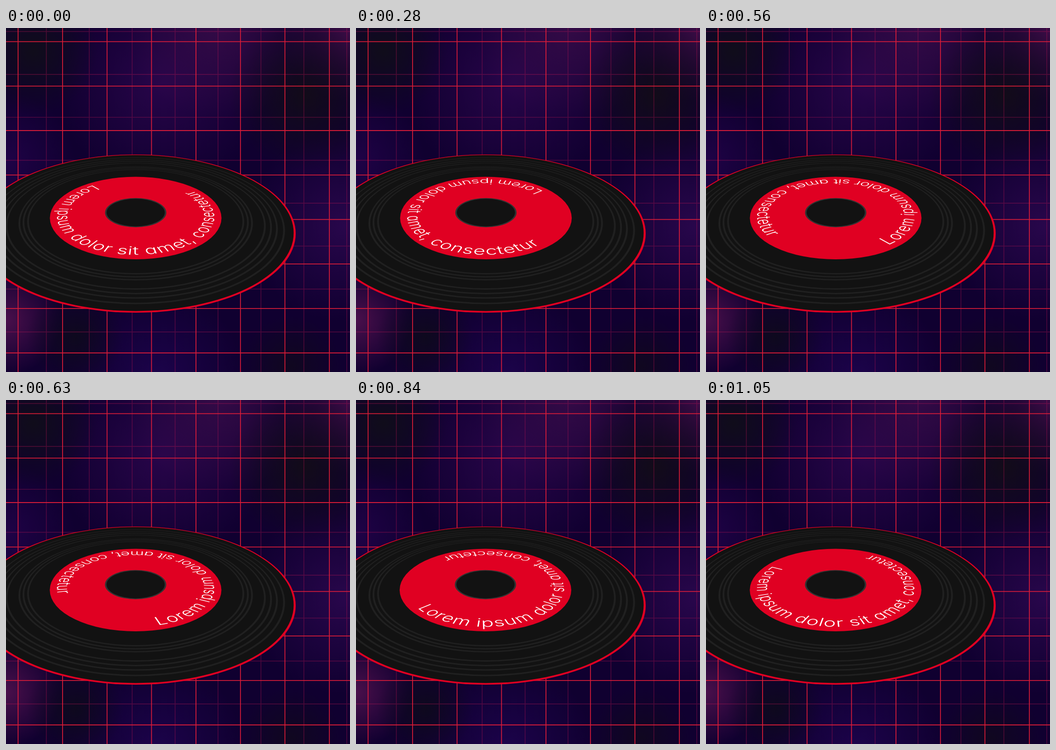
An HTML page with a canvas that plays this animation: 748 by 748 pixels, repeating every 1.12 s.

```html
<!DOCTYPE html>
<html lang="en">
<head>
<meta charset="utf-8">
<title>Spinning record</title>
<style>
  html, body { margin: 0; width: 100%; height: 100%; overflow: hidden; background: #100030; }
  canvas { display: block; width: 748px; height: 748px; }
</style>
</head>
<body>
<canvas id="stage" width="748" height="748"></canvas>
<script>
const SIZE = 748, STEP = 70, STEPS = 16;
const ctx = document.getElementById('stage').getContext('2d');

// Perspective view of a flat disc of radius 1
const view = { x: 282, y: 399.7, sx: 334.6, sy: 159, p: 0.275 };

const RED = '#e00022', BLACK = '#121212', GROOVE = '#202020';
const grooves = [0.932, 0.89, 0.855, 0.818, 0.74, 0.715, 0.687];

// Single-storey "a" to suit the geometric lettering
const letters = [...'Lorem ipsum dolor sit amet, consectetur'.replace('a', 'ɑ')];
const FONT = '300 39.5px Inter, "Noto Sans", sans-serif';
const TEXT_START = -126.5, TEXT_ARC = 272, MID_RADIUS = 0.474, BASELINE = 10.7;

// x, y, radius, colour, opacity
const glows = [
  [340, 120, 230, '46,6,80', 0.8],
  [470, -10, 210, '62,14,76', 0.75],
  [748, 10, 150, '72,16,76', 0.75],
  [735, 430, 210, '46,8,82', 0.8],
  [0, 290, 150, '36,3,78', 0.75],
  [330, 760, 190, '32,4,84', 0.75],
  [0, 635, 120, '84,18,80', 0.85],
  [60, 50, 140, '16,14,24', 0.9],
  [650, 145, 165, '18,12,24', 0.95],
  [150, 672, 105, '14,10,28', 0.9],
  [620, 735, 110, '16,8,30', 0.9]
];

const rad = deg => deg * Math.PI / 180;

function grid(x0, y0, gap, width, color) {
  ctx.beginPath();
  for (let i = 0; i < 9; i++) {
    const x = x0 + i * gap, y = y0 + i * gap;
    ctx.moveTo(x, 0);
    ctx.lineTo(x, SIZE);
    ctx.moveTo(0, y);
    ctx.lineTo(SIZE, y);
  }
  ctx.lineWidth = width;
  ctx.strokeStyle = color;
  ctx.stroke();
}

function background() {
  ctx.fillStyle = '#100030';
  ctx.fillRect(0, 0, SIZE, SIZE);
  for (const [x, y, r, rgb, alpha] of glows) {
    const g = ctx.createRadialGradient(x, y, 0, x, y, r);
    g.addColorStop(0, `rgba(${rgb},${alpha})`);
    g.addColorStop(0.5, `rgba(${rgb},${alpha * 0.5})`);
    g.addColorStop(1, `rgba(${rgb},0)`);
    ctx.fillStyle = g;
    ctx.fillRect(0, 0, SIZE, SIZE);
  }
  grid(87.7, 7.6, 93.33, 1.7, 'rgba(200,24,84,0.32)');
  grid(26.3, 29.6, 96.7, 1.8, 'rgba(236,30,56,0.9)');
}

// A circle on the disc is seen as an exact ellipse
function circle(r, color, shift = 0) {
  const { x, y, sx, sy, p } = view;
  const d = 1 - p * p * r * r;
  ctx.beginPath();
  ctx.ellipse(x + shift, y + sy * p * r * r / d, r * sx / Math.sqrt(d), r * sy / d, 0, 0, 2 * Math.PI);
  ctx.fillStyle = color;
  ctx.fill();
}

function ring(r, width, outer, inner) {
  circle(r + width / 2, outer);
  circle(r - width / 2, inner);
}

function glyph(char, width, angle, shift) {
  const { x, y, sx, sy, p } = view;
  const c = Math.cos(angle), s = Math.sin(angle);
  const X = MID_RADIUS * c, Y = MID_RADIUS * s, w = 1 / (1 - p * Y);
  // Local stretch of the view, applied to the tangent and outward directions
  const xx = w, xy = X * p * w * w, yy = sy / sx * w * w;
  ctx.setTransform(
    xx * s - xy * c, -yy * c,
    xx * c + xy * s, yy * s,
    x + shift + sx * X * w, y + sy * Y * w
  );
  ctx.fillText(char, -width / 2, BASELINE);
}

function lettering(turn, shift) {
  ctx.font = FONT;
  ctx.fillStyle = '#fff';
  const widths = letters.map(l => ctx.measureText(l).width);
  const total = widths.reduce((a, b) => a + b);
  let pos = 0;
  letters.forEach((l, i) => {
    const mid = (pos + widths[i] / 2) / total;
    glyph(l, widths[i], rad(TEXT_START + turn - TEXT_ARC * mid), shift);
    pos += widths[i];
  });
  ctx.resetTransform();
}

function draw(now) {
  const turn = Math.floor(now / STEP) % STEPS * 360 / STEPS;
  const shift = 0.5 * Math.sin(rad(turn));
  background();
  circle(1, RED);
  circle(0.988, BLACK);
  for (const r of grooves) ring(r, 0.011, GROOVE, BLACK);
  circle(0.5513, RED, shift);
  circle(0.199, '#333', shift);
  circle(0.189, BLACK, shift);
  lettering(turn, shift);
}

const start = performance.now();
function loop() {
  draw(performance.now() - start);
  requestAnimationFrame(loop);
}
loop();
</script>
</body>
</html>
```
